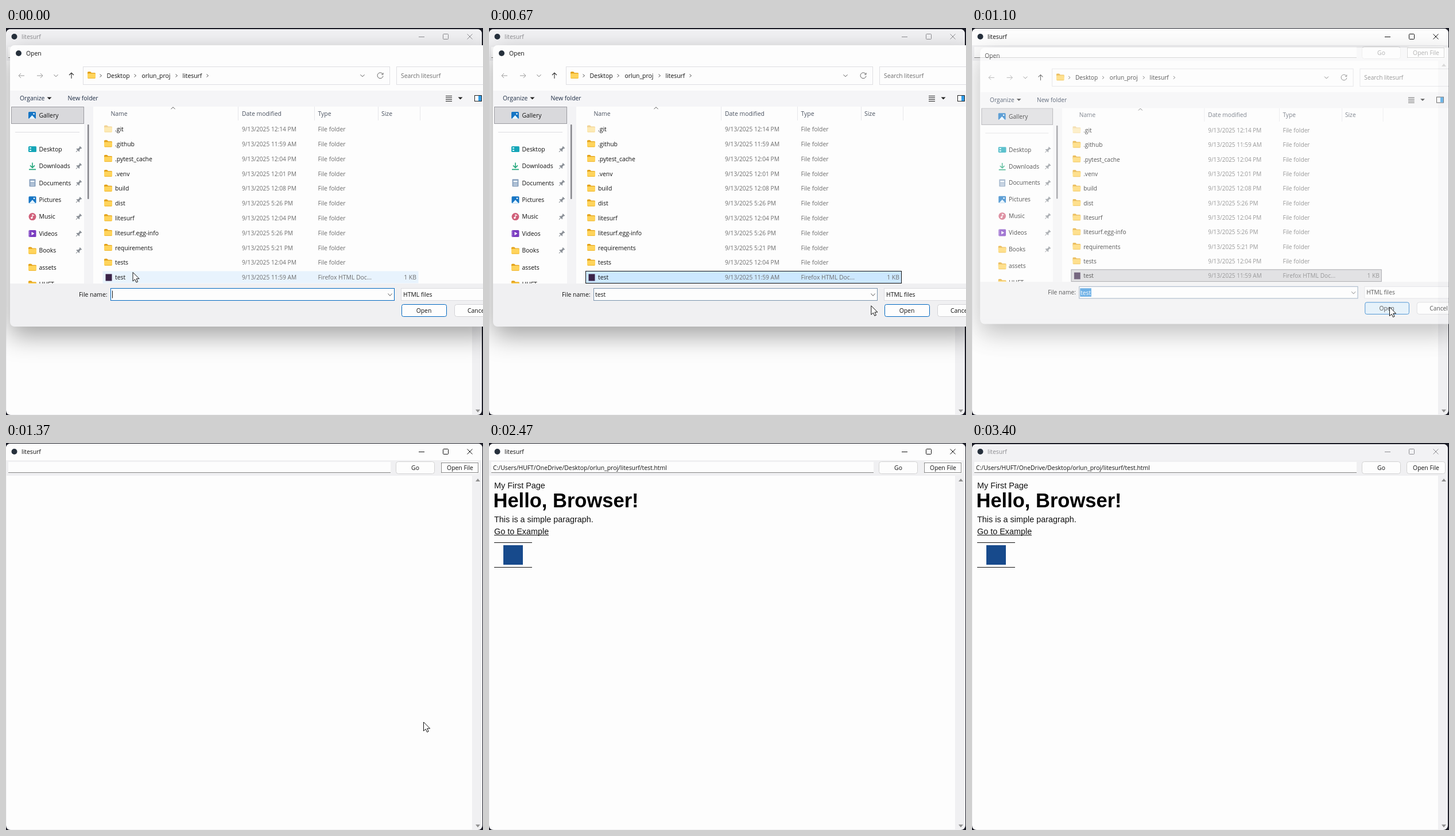
An HTML page that plays this animation: 831x674 px, repeating every 3.43 s.

```html
<!DOCTYPE html>
<html lang="en">
<head>
<meta charset="utf-8">
<title>litesurf</title>
<style>
html, body { margin: 0; height: 100%; overflow: hidden; background: #1b1c26; }
svg { display: block; }
text { font-family: "Open Sans", "Noto Sans", sans-serif; font-size: 10.4px; white-space: pre; }
.page text { font-family: "Liberation Sans", Arial, sans-serif; font-size: 14.4px; }
.page .h1 { font-size: 34.5px; font-weight: bold; }
</style>
</head>
<body>
<svg id="stage" width="831" height="674" viewBox="0 0 831 674"></svg>
<script>
const LOOP = 3430;
const SELECT = 230, HOVER = 720, PRESS = 960, CLOSE = 1060, CLOSED = 1190, LOADED = 1650, BLUR = 3300;
const WHITE = '#fdfdfd', PANEL = '#f0f0f2', GREY = '#6d6d6d', BLUE = '#0067c0';

// Shape helpers: every one returns SVG markup. Text is placed by its vertical centre.
const rect = (x, y, w, h, fill, extra = '') =>
  `<rect x="${x}" y="${y}" width="${w}" height="${h}" fill="${fill}" ${extra}/>`;
const box = (x, y, w, h, fill, stroke, r = 0) =>
  rect(x + .5, y + .5, w - 1, h - 1, fill, `stroke="${stroke}" rx="${r}"`);
const line = (d, stroke = '#222', width = 1, extra = '') =>
  `<path d="${d}" fill="none" stroke="${stroke}" stroke-width="${width}" ${extra}/>`;
const shape = (d, fill) => `<path d="${d}" fill="${fill}"/>`;
const dot = (x, y, r, fill, extra = '') => `<circle cx="${x}" cy="${y}" r="${r}" fill="${fill}" ${extra}/>`;
const text = (x, y, s, fill = '#111', extra = '') =>
  `<text x="${x}" y="${y + 3.7}" fill="${fill}" ${extra}>${s}</text>`;
const middle = 'text-anchor="middle"', end = 'text-anchor="end"';
const group = (id, body, extra = '') => `<g id="${id}" ${extra}>${body}</g>`;
const chevron = (x, y, dx, dy, color = '#555') => dx
  ? line(`M${x - dx / 2} ${y - 2.5}l${dx} 2.5l${-dx} 2.5`, color)
  : line(`M${x - 3.5} ${y - dy / 2}l3.5 ${dy}l3.5 ${-dy}`, color);
const triangle = (x, y, h, w = 4, color = '#222') =>
  shape(`M${x - w} ${y - h / 2}h${2 * w}l${-w} ${h}z`, color);

const folder = (x, y, pale) => `<g transform="translate(${x} ${y - 6})" opacity="${pale ? .45 : 1}">`
  + shape('M0 1.5q0-1.5 1.5-1.5h3.5l2 2h5.5q1.5 0 1.5 1.5v3h-14z', '#e3a21a')
  + rect(0, 3.2, 14, 8.8, '#ffd45c', 'rx="1.2"') + rect(1, 11, 12, 1, '#eeb52d') + '</g>';
const pin = y => `<g transform="translate(127 ${y}) rotate(45)">`
  + shape('M-2.5 -5h5v1l-1 1v3l2 2v1h-7v-1l2-2v-3l-1-1z', '#8b9097') + line('M0 3v4', '#8b9097') + '</g>';
const picture = (x, y) => rect(x, y - 6, 13, 12, '#1675c4', 'rx="1.5"')
  + shape(`M${x + 1} ${y + 6}l5.5-6l5.5 6z`, '#e6f5ff') + dot(x + 9.5, y - 2.5, 1.3, '#fff');

const sideIcons = {
  Desktop: y => rect(39, y - 5, 14, 10, '#16a6b8', 'rx="1.5"') + rect(41, y - 3, 3, 2, '#d5fbff')
    + rect(41, y + 1, 3, 2, '#d5fbff'),
  Downloads: y => line(`M46 ${y - 6}v9m-4-4l4 4l4-4M40 ${y + 6}h12`, '#20a67a', 1.6),
  Documents: y => rect(40.5, y - 6.5, 11, 13, '#8ba3bf', 'rx="1"') + rect(42.5, y - 4, 7, 3, '#eaf2fa')
    + line(`M42.5 ${y + 1.5}h7m-7 2.5h7`, '#eaf2fa'),
  Pictures: y => picture(39.5, y),
  Music: y => dot(46, y, 6.5, '#d0607a') + line(`M46 ${y + 2}v-5.5l3 1.5`, '#fff', 1.2) + dot(44.7, y + 2, 1.7, '#fff'),
  Videos: y => rect(39.5, y - 6, 13, 12, '#7a3cc0', 'rx="1.5"') + shape(`M44.5 ${y - 3}l5 3l-5 3z`, '#fff')
    + line(`M41 ${y - 5}v10`, '#d9bff2', 1, 'stroke-dasharray="1.5 1.5"'),
};

function mainWindow() {
  const button = (x, s) => box(x, 32, 68, 22, WHITE, '#d3d3d3', 4) + text(x + 34, 43, s, '#111', middle);
  const titleBar = group('caption',
    text(27, 15, 'litesurf', 'currentColor')
    + line('M719 15.5h10M761.5 11.5q0-1 1-1h7q1 0 1 1v7q0 1-1 1h-7q-1 0-1-1zM803.5 10.5l9 9m0-9l-9 9', 'currentColor'));
  const page = text(9, 75, 'My First Page')
    + `<text class="h1" x="7.5" y="112">Hello, Browser!</text>`
    + text(9, 134, 'This is a simple paragraph.')
    + text(9, 155, 'Go to Example') + line('M9 160.5h95M9 173.5h66M9 216.5h66', '#111')
    + rect(25, 178, 34, 34, '#174a8c');
  return `<clipPath id="frame">${rect(0, 1, 830, 673, '#000', 'id="frameBox" rx="8"')}</clipPath>`
    + '<g clip-path="url(#frame)">'
    + rect(0, 0, 831, 674, PANEL) + rect(0, 0, 831, 30, WHITE, 'id="titleFill"')
    + dot(14.5, 15, 5, '#26303c') + titleBar
    + rect(4, 33, 666, 19, WHITE) + line('M4 51.5h666', '#858585')
    + button(679, 'Go') + button(757, 'Open File')
    + group('focus', box(757, 32, 68, 22, WHITE, WHITE, 4)
      + rect(758.5, 34.5, 64, 17, 'none', 'stroke="#111" stroke-dasharray="1 1"') + text(791, 43, 'Open File', '#111', middle))
    + rect(1, 57, 811, 616, WHITE)
    + triangle(822, 64.5, -5, 4, '#8f8f8f') + triangle(822, 667, 5, 4, '#8f8f8f')
    + group('loaded', text(7, 43, 'C:/Users/HUFT/OneDrive/Desktop/orlun_proj/litesurf/test.html')
      + group('content', page, 'class="page"'))
    + '</g>';
}

function navigation() {
  const crumbs = [[175.5, 'Desktop', 225], [236.5, 'orlun_proj', 297], [307.5, 'litesurf', 351]];
  return line('M32 83h-10m4-4l-4 4l4 4M54 83h10m-4-4l4 4l-4 4', '#999')
    + chevron(87, 83, 0, 3.5, '#777') + line('M114 88v-10m-4 4l4-4l4 4', '#333', 1.1)
    + box(134, 67, 535, 32, WHITE, '#dedee2') + folder(142, 82) + chevron(165, 83, 3, 0)
    + crumbs.map(([x, s, next]) => text(x, 83, s) + chevron(next, 83, 3, 0)).join('')
    + chevron(621, 83, 0, 3.5) + line('M656.5 80.5a5 5 0 1 0 .5 3M657 78v3h-3', '#666')
    + box(680, 67, 180, 32, WHITE, '#dedee2') + text(688, 83, 'Search litesurf', GREY)
    + rect(7, 109, 843, 28, '#f5f5f7')
    + text(24, 122.5, 'Organize', '#1d2c44') + triangle(75.5, 122.5, 4)
    + text(107.5, 122.5, 'New folder', '#1d2c44')
    + line('M766 118.5h11m-11 3h11m-11 3h11m-11 3h11', '#222') + triangle(791.5, 122.5, 4)
    + box(816, 117, 13, 11, WHITE, '#222') + rect(823, 118, 5, 9, '#2f9be6');
}

function sidebar() {
  const names = [...Object.keys(sideIcons), 'Books', 'assets', 'HUFT'];
  return rect(136, 137, 16, 308, '#f3f3f5') + rect(142, 168, 2.5, 130, '#85858b', 'rx="1"')
    + box(9, 137, 127, 30, '#d9d9dc', '#9a9aa0') + picture(39, 152) + text(57.5, 152, 'Gallery')
    + line('M16 181.5h112', '#dcdce0')
    + names.map((name, i) => {
      const y = 211 + 29.4 * i;
      return (sideIcons[name] || (y => folder(39, y)))(y) + text(57.5, y, name) + (i < 7 ? pin(y) : '');
    }).join('');
}

function fileList() {
  const headers = [[182.5, 'Name'], [411, 'Date modified'], [543.5, 'Type'], [654, 'Size']];
  const files = [['.git', '12:14 PM'], ['.github', '11:59 AM'], ['.pytest_cache', '12:04 PM'], ['.venv', '12:01 PM'],
    ['build', '12:08 PM'], ['dist', '5:26 PM'], ['litesurf', '12:04 PM'], ['litesurf.egg-info', '5:26 PM'],
    ['requirements', '5:21 PM'], ['tests', '12:04 PM'], ['test', '11:59 AM']];
  return headers.map(([x, s]) => text(x, 149.5, s, '#4a5260')).join('')
    + line('M404.5 137v24M537.5 137v24M648.5 137v24M721.5 137v24', '#e6e6ea')
    + chevron(291, 139.5, 0, -3.5)
    + rect(168.5, 423.5, 550, 21, '#e8f3fd', 'id="row"')
    + files.map(([name, time], i) => {
      const y = 176.5 + 25.8 * i, isFile = name === 'test';
      return (isFile ? rect(173.5, y - 6, 11, 12, '#3a2348') : folder(171, y - 1, i === 0))
        + text(190, y, name)
        + text(411, y, '9/13/2025 ' + time, GREY, 'style="font-size:10.2px"')
        + text(543.5, y, isFile ? 'Firefox HTML Doc...' : 'File folder', GREY)
        + (isFile ? text(715, y, '1 KB', GREY, end) : '');
    }).join('');
}

function footer() {
  return rect(7, 445, 843, 67, PANEL)
    + text(176.5, 464, 'File name:', '#111', end)
    + rect(182.5, 453.5, 494, 21, WHITE, 'id="nameBox"') + chevron(669, 464.5, 0, 4)
    + line('M185.5 457.5v13', '#111', 1, 'id="caret"')
    + rect(184, 456.5, 20, 15, '#2f8fdc', 'id="marked"') + text(185, 464.5, 'test', '#111', 'id="fileName"')
    + box(688, 453, 162, 22, WHITE, '#dcdce0') + text(692, 464, 'HTML files')
    + rect(689.5, 481.5, 78, 21, WHITE, `id="open" stroke="${BLUE}" rx="3"`) + text(728, 492, 'Open', '#111', middle)
    + box(781, 481, 80, 22, WHITE, '#d3d3d6', 4) + text(804, 492, 'Cancel');
}

function dialog() {
  return rect(7, 30, 843, 490, PANEL, 'rx="8" style="filter:drop-shadow(0 16px 22px rgba(0,0,0,.36))"')
    + rect(7, 30, 843, 60, WHITE, 'rx="8"') + rect(7, 60, 843, 385, WHITE)
    + dot(22, 44, 5, '#26303c', 'id="dialogIcon"')
    + text(35, 44, 'Open', '#111', 'id="dialogTitle"')
    + navigation()
    + `<clipPath id="browse">${rect(7, 137, 843, 308, '#000')}</clipPath>`
    + group('browser', sidebar() + fileList(), 'clip-path="url(#browse)"')
    + footer();
}

const stage = document.getElementById('stage');
stage.innerHTML = mainWindow() + group('dialog', dialog())
  + group('cursor', '<path d="M0 0v15.5l3.6-3.3l2.4 5.3l2.6-1.1l-2.4-5.2h4.9z" fill="#fff" stroke="#111"/>');

const $ = id => document.getElementById(id);
const set = (id, attrs) => Object.entries(attrs).forEach(([k, v]) => $(id).setAttribute(k, v));
const show = (id, on) => set(id, { visibility: on ? 'visible' : 'hidden' });
const progress = (t, from, to) => Math.min(1, Math.max(0, (t - from) / (to - from)));
const smooth = u => u * u * (3 - 2 * u);

function draw(t) {
  const active = t >= CLOSE && t < BLUR;
  set('frameBox', active ? { y: 1, width: 830, height: 673 } : { y: 2, width: 829, height: 672 });
  set('titleFill', { fill: active ? WHITE : '#f2f2f4' });
  set('caption', { color: active ? '#111' : '#8c8c90' });
  show('focus', active);
  show('loaded', t >= LOADED);

  const closing = progress(t, CLOSE, CLOSED), scale = 1 - .056 * closing;
  set('dialog', {
    display: closing < 1 ? 'inline' : 'none',
    opacity: 1 - closing,
    transform: `translate(424 272) scale(${scale}) translate(-424 -272)`,
  });
  show('dialogIcon', !closing);
  set('dialogTitle', { x: closing ? 15 : 35 });

  const selected = t >= SELECT, pressed = t >= PRESS;
  set('row', {
    fill: pressed ? '#d6d6da' : selected ? '#cce8ff' : '#e8f3fd',
    stroke: pressed ? '#85858b' : selected ? '#111' : 'none',
  });
  set('nameBox', { stroke: selected ? '#7a93ad' : BLUE });
  show('caret', !selected);
  show('marked', pressed);
  set('fileName', { fill: pressed ? '#fff' : '#111', visibility: selected ? 'visible' : 'hidden' });
  set('open', { fill: t >= HOVER ? '#dcedfa' : WHITE });

  const across = progress(t, 330, 766), away = smooth(progress(t, 1600, 2104));
  const x = 221 + 506.5 * smooth(across) + 11 * away;
  const y = 425.5 + 60.5 * smooth(Math.min(1, across * 1.13)) - 510.5 * away;
  set('cursor', { transform: `translate(${x} ${y})` });
}

const start = performance.now();
(function tick() {
  draw((performance.now() - start) % LOOP);
  requestAnimationFrame(tick);
})();
</script>
</body>
</html>
```
